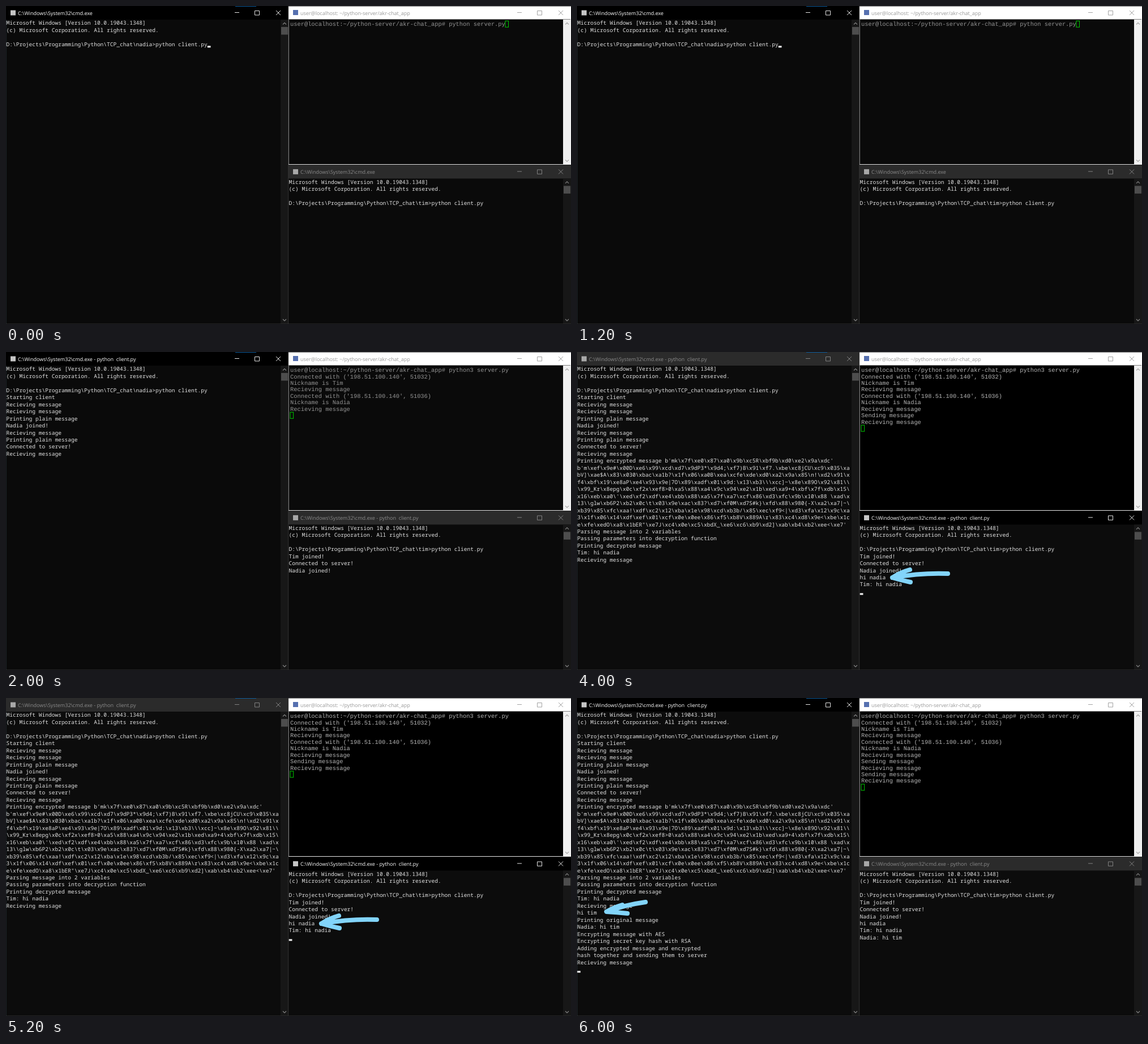
An HTML page for the animation above (8000 ms loop, 998 by 561 pixels).

```html
<!DOCTYPE html>
<html lang="en">
<head>
<meta charset="utf-8">
<title>Chat terminals</title>
<style>
html, body { margin: 0; width: 100%; height: 100%; overflow: hidden; background: #0c0c0c; }
svg { display: block; width: 998px; height: 561px; }
text { white-space: pre; text-rendering: geometricPrecision; }
.cmd { font: 500 9.55px "Noto Sans Mono", monospace; fill: #e2e2e2; }
.ssh { font: 10.38px "Liberation Mono", monospace; }
.title { font: 9px "Open Sans", sans-serif; }
.line { fill: none; }
.arrow { fill: none; stroke: #82d4fa; stroke-width: 8; stroke-linecap: round; stroke-linejoin: round; }
</style>
</head>
<body>
<svg id="stage" viewBox="0 0 998 561"></svg>
<script>
const stage = document.getElementById('stage');
const STEP = 2000, ROW = 12.46, COL = 5.73, SSH_ROW = 11.42, SSH_COL = 6.228;

const banner = `Microsoft Windows [Version 10.0.19043.1348]
(c) Microsoft Corporation. All rights reserved.

D:\\Projects\\Programming\\Python\\TCP_chat\\`;

const left = (banner + String.raw`nadia>python client.py
Starting client
Recieving message
Recieving message
Printing plain message
Nadia joined!
Recieving message
Printing plain message
Connected to server!
Recieving message
Printing encrypted message b'mk\x7f\xe0\x87\xa0\x9b\xc5R\xbf9b\xd0\xe2\x9a\xdc'
b'm\xef\x9e#\x00D\xe6\x99\xcd\xd7\x9dP3*\x9d4;\xf7)B\x91\xf7.\xbe\xc8jCU\xc9\x035\xa
bV]\xae$A\x83\x030\xbac\xa1b?\x1f\x06\xa0B\xea\xcfe\xde\xd0\xa2\x9a\x85\n!\xd2\x91\x
f4\xbf\x19\xe8aP\xe4\x93\x9e|7O\x89\xadf\x01\x9d:\x13\xb3\\\xcc]~\x8e\x89O\x92\x81\\
\x99_Kr\x8epg\x0c\xf2x\xef8>0\xa5\x88\xa4\x9c\x94\xe2\x1b\xed\xa9+4\xbf\x7f\xdb\x15\
x16\xeb\xa0\'\xed\xf2\xdf\xe4\xbb\x88\xa5\x7f\xa7\xcf\x86\xd3\xfc\x9b\x10\x88 \xad\x
13\\glw\xb6P2\xb2\x0c\t\x03\x9e\xac\x83?\xd7\xf0M\xd7S#k}\xfd\x88\x980{-X\xa2\xa7|~\
xb39\x85\xfc\xaa!\xdf\xc2\x12\xba\x1e\x98\xcd\xb3b/\x85\xec\xf9<|\xd3\xfa\x12\x9c\xa
3\x1f\x06\x14\xdf\xef\x01\xcf\x0e\x0ee\x86\xf5\xb8V\x889A\r\x83\xc4\xd8\x9e<\xbe\x1c
e\xfe\xedO\xa8\x1bER"\xe7J\xc4\x0e\xc5\xbdX_\xe6\xc6\xb9\xd2]\xab\xb4\xb2\xee<\xe7'
Parsing message into 2 variables
Passing parameters into decryption function
Printing decrypted message
Tim: hi nadia
Recieving message
hi tim
Printing original message
Nadia: hi tim
Encrypting message with AES
Encrypting secret key hash with RSA
Adding encrypted message and encrypted
hash together and sending them to server
Recieving message`).split('\n');

const right = (banner + `tim>python client.py
Tim joined!
Connected to server!
Nadia joined!
hi nadia
Tim: hi nadia
Nadia: hi tim`).split('\n');

const server = `Connected with ('198.51.100.140', 51032)
Nickname is Tim
Recieving message
Connected with ('198.51.100.140', 51036)
Nickname is Nadia
Recieving message
Sending message
Recieving message
Sending message
Recieving message`.split('\n');

// Terminal colours before and after the first message is sent
const idle = { cmdPaper: '#0a0a0a', sshPaper: '#0a0a0a', sshInk: '#949494' };
const busy = { cmdPaper: '#0c0c0c', sshPaper: '#000', sshInk: '#b4b4b4' };

// rows: visible lines in the left, right and server windows; caret: [window, row, column]
const states = [
  { rows: [4, 4, 0], theme: idle, active: 'left', caret: ['left', 3, 62] },
  { rows: [13, 7, 6], theme: idle, active: 'left' },
  { rows: [28, 9, 8], theme: busy, active: 'right', caret: ['right', 9, 0],
    arrow: 'M655 391Q610 389 557 398M588 384Q570 389 557 398Q574 403 589 406' },
  { rows: [36, 10, 10], theme: busy, active: 'left', caret: ['left', 36, 0],
    arrow: 'M121 360Q85 365 52 377M80 365Q66 369 52 377Q70 378 89 380' }
];

const esc = s => s.replace(/&/g, '&amp;').replace(/</g, '&lt;');
const rect = (x, y, w, h, fill) => `<rect x="${x}" y="${y}" width="${w}" height="${h}" fill="${fill}"/>`;
const line = (d, color, width = 0.9) => `<path class="line" d="${d}" stroke="${color}" stroke-width="${width}"/>`;
const text = (x, y, cls, s, fill = '') =>
  `<text x="${x}" y="${y}" class="${cls}"${fill && ` fill="${fill}"`}>${esc(s)}</text>`;
const lines = (list, x, y, step, cls, fill) =>
  list.map((s, i) => text(x, y + i * step, cls, s, fill)).join('');

function titleBar(x, y, w, name, bg, ink, icon) {
  const r = x + w, c = y + 12;
  return rect(x, y, w, 24, bg) + icon + text(x + 21, y + 15.6, 'title', name, ink) +
    line(`M${r - 95} ${c - 0.5}h8M${r - 59.5} ${c - 3.5}h8v7.5h-8zM${r - 22} ${c - 4}l8 8m0-8l-8 8`, ink);
}

function scrollBar(x, top, bottom, bg, ink, thumb) {
  return rect(x, top, 14, bottom - top, bg) +
    (thumb ? rect(x + 1, top + 13, 12, 13.5, thumb) : '') +
    line(`M${x + 4} ${top + 8.5}l3-3l3 3M${x + 4} ${bottom - 8.5}l3 3l3-3`, ink, 1.1);
}

function cmdWindow(x, y, w, list, name, active, paper) {
  return rect(x, y, w, 561 - y, paper) +
    titleBar(x, y, w, name, active ? '#000' : '#2b2b2b', active ? '#fff' : '#8c8c8c',
      rect(x + 8, y + 7.5, 9, 9, active ? '#c4c4c4' : '#a8a8a8')) +
    scrollBar(x + w - 14, y + 24, 561, '#171717', '#858585', '#4d4d4d') +
    lines(list, x + 0.5, y + 33.4, ROW, 'cmd');
}

function sshWindow(list, paper, ink) {
  return rect(499, 0, 499, 280, paper) +
    titleBar(499, 0, 499, 'user@localhost: ~/python-server/akr-chat_app', '#fff', '#999',
      rect(507, 7, 9, 9, '#5670b0')) +
    scrollBar(984, 24, 280, '#f0f0f0', '#a3a3a3') +
    // sunken edge around the text area
    line('M499.5 279V23.5H997', '#808080', 1) + line('M499 279.5H998', '#e4e4e4', 1) +
    rect(499, 0, 499, 0.8, '#555') +
    lines(list, 502, 35.2, SSH_ROW, 'ssh', ink);
}

function draw(n) {
  const { rows, theme, active, caret, arrow } = states[n];
  const name = 'C:\\Windows\\System32\\cmd.exe' + (n ? ' - python  client.py' : '');
  const prompt = `user@localhost:~/python-server/akr-chat_app# python${n ? '3' : ''} server.py`;
  const cx = n ? 0 : prompt.length, cy = n ? rows[2] + 1 : 0;

  let out = cmdWindow(0, 0, 499, left.slice(0, rows[0]), name, active === 'left', theme.cmdPaper) +
    rect(405, 0, 37, 1, '#0a5a9c') + rect(0, 24, 0.6, 537, '#26323a') +
    sshWindow([prompt, ...server.slice(0, rows[2])], theme.sshPaper, theme.sshInk) +
    `<rect x="${502 + cx * SSH_COL}" y="${26.3 + cy * SSH_ROW}" width="5.6" height="11" class="line" stroke="#00c800"/>` +
    cmdWindow(499, 280.4, 499, right.slice(0, rows[1]), name, active === 'right', theme.cmdPaper) +
    rect(498.3, 0, 0.8, 561, '#3a3a3a') + rect(0, 560.4, 998, 0.6, '#333');

  if (caret) {
    const [side, row, col] = caret;
    const [x, y] = side === 'left' ? [0.5, 24] : [499.7, 304.4];
    out += rect(x + col * COL, y + (row + 1) * ROW - 3.6, COL, 3.1, '#f2f2f2');
  }
  if (arrow) out += `<path class="arrow" d="${arrow}"/>`;
  stage.innerHTML = out;
}

let shown = -1;
function tick() {
  const n = Math.floor(performance.now() / STEP) % states.length;
  if (n !== shown) draw(shown = n);
  requestAnimationFrame(tick);
}
tick();
</script>
</body>
</html>
```
